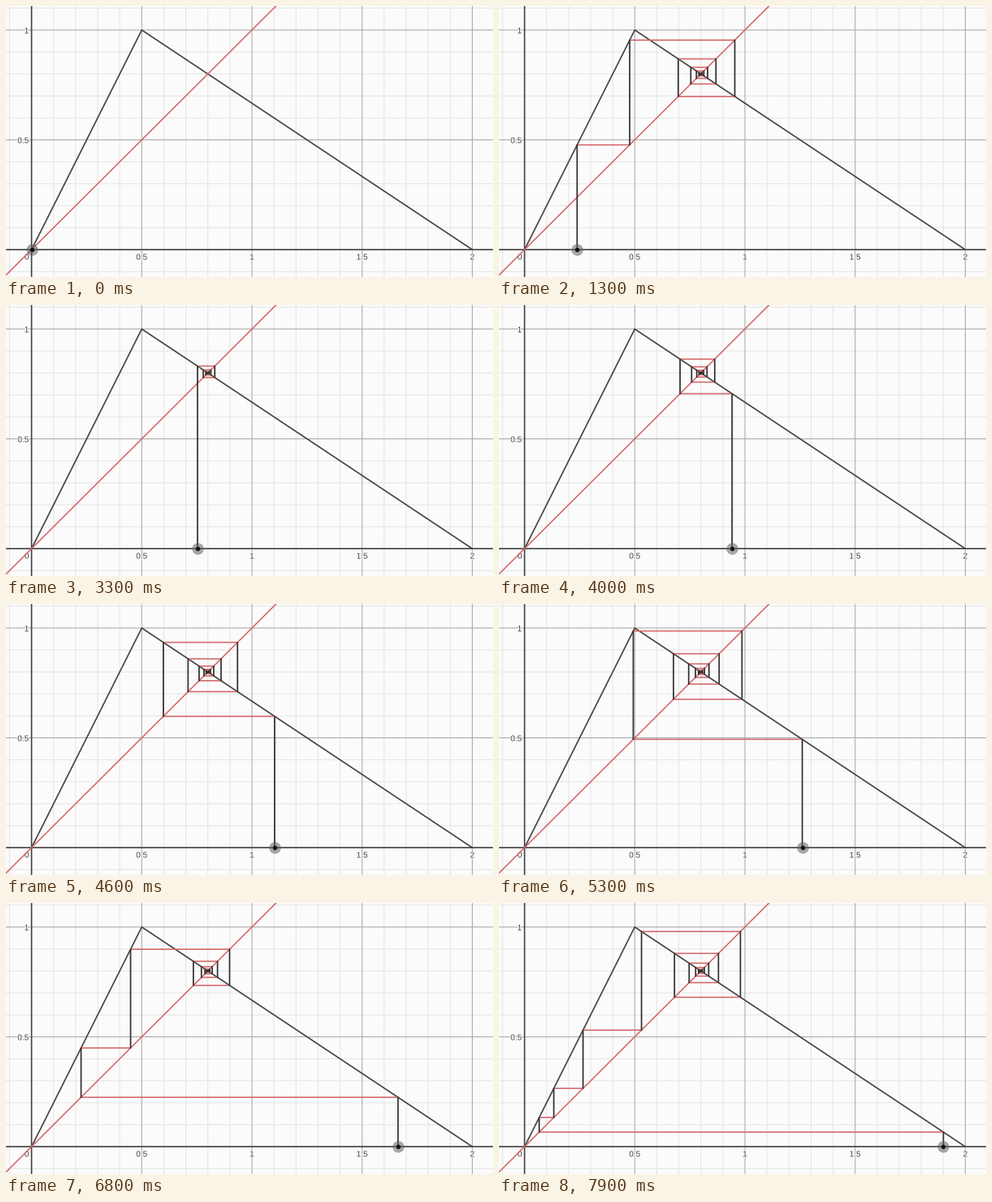
Animation of 600 by 335 pixels, one loop 8000 ms. Source, as a matplotlib script:

```python
import numpy as np
import matplotlib.pyplot as plt
from matplotlib.animation import FuncAnimation
from matplotlib.patheffects import withStroke

W, H, DPI = 600, 335, 100
X0, Y0, UNIT = 31.5, 301.2, 271.5      # origin and scale in pixels
STEP, FRAMES, ITERATIONS = 100, 80, 26
PX = 72 / DPI

BACK, DARK, RED = "#fcfbfc", "#454545", "#d4686a"

# Start value of the orbit at a few moments (ms)
TIMES = [100, 1300, 3300, 4600, 5500, 5900, 6800, 7300, 7900]
STARTS = [0, 0.2385, 0.753, 1.103, 1.305, 1.406, 1.663, 1.765, 1.9005]


def px(x):
    return X0 + UNIT * np.asarray(x, float)


def py(y):
    return Y0 - UNIT * np.asarray(y, float)


def tent(x):
    return 2 * x if x < 0.5 else (2 - x) * 2 / 3


def cobweb(x):
    """Vertical and horizontal segments, separated by NaN."""
    up, across = [], []
    y = 0
    for _ in range(ITERATIONS):
        nxt = tent(x)
        up += [(x, y), (x, nxt), (np.nan, np.nan)]
        across += [(x, nxt), (nxt, nxt), (np.nan, np.nan)]
        x = y = nxt
    return np.array(up), np.array(across)


plt.rcParams["font.family"] = "Liberation Sans"
fig = plt.figure(figsize=(W / DPI, H / DPI), dpi=DPI, facecolor=BACK)
ax = fig.add_axes([0, 0, 1, 1])
ax.set_xlim(0, W)
ax.set_ylim(H, 0)
ax.axis("off")


def line(xs, ys, color, width, z):
    return ax.plot(px(xs), py(ys), color=color, lw=width * PX, zorder=z,
                   solid_capstyle="round", solid_joinstyle="round",
                   snap=False)[0]


def label(x, y, text, ha="center"):
    ax.text(x, y, text, size=10 * PX, color="#444444", ha=ha,
            va="center_baseline", zorder=4,
            path_effects=[withStroke(linewidth=2 * PX, foreground=BACK)])


# Grid and axes
for k in range(-1, 22):
    if k == 0:
        color, width, z = "#3c3c3c", 1.6, 2
    elif k % 5 == 0:
        color, width, z = "#acacac", 1.1, 1.5
    else:
        color, width, z = "#e4e4e4", 1, 1
    style = dict(color=color, lw=width * PX, zorder=z, snap=False)
    ax.axvline(px(k / 10), **style)
    ax.axhline(py(k / 10), **style)

label(25.7, 309.5, "0")
for v in (0.5, 1, 1.5, 2):
    label(px(v), 309.5, f"{v:g}")
for v in (0.5, 1):
    label(28.2, py(v), f"{v:g}", "right")

# Map, diagonal, orbit
line([0, 0.5, 2], [0, 1, 0], DARK, 1.7, 5)
line([-0.2, 1.3], [-0.2, 1.3], RED, 1.6, 6)
across_line = line([], [], RED, 1.6, 7)
up_line = line([], [], "#2e2e2e", 1.7, 8)

# Draggable point
halo, = ax.plot([], [], "o", ms=14.5 * PX, color="#606060", alpha=0.55,
                mew=0, zorder=9, snap=False)
dot, = ax.plot([], [], "o", ms=5.5 * PX, color="#151515", mew=0, zorder=10,
               snap=False)


def update(i):
    x = np.interp(i * STEP, TIMES, STARTS)
    up, across = cobweb(x)
    up_line.set_data(px(up[:, 0]), py(up[:, 1]))
    across_line.set_data(px(across[:, 0]), py(across[:, 1]))
    for point in (halo, dot):
        point.set_data([px(x)], [py(0)])
    return across_line, up_line, halo, dot


anim = FuncAnimation(fig, update, frames=FRAMES, interval=STEP,
                     init_func=lambda: update(0), repeat=True, repeat_delay=0)
plt.show()
```
